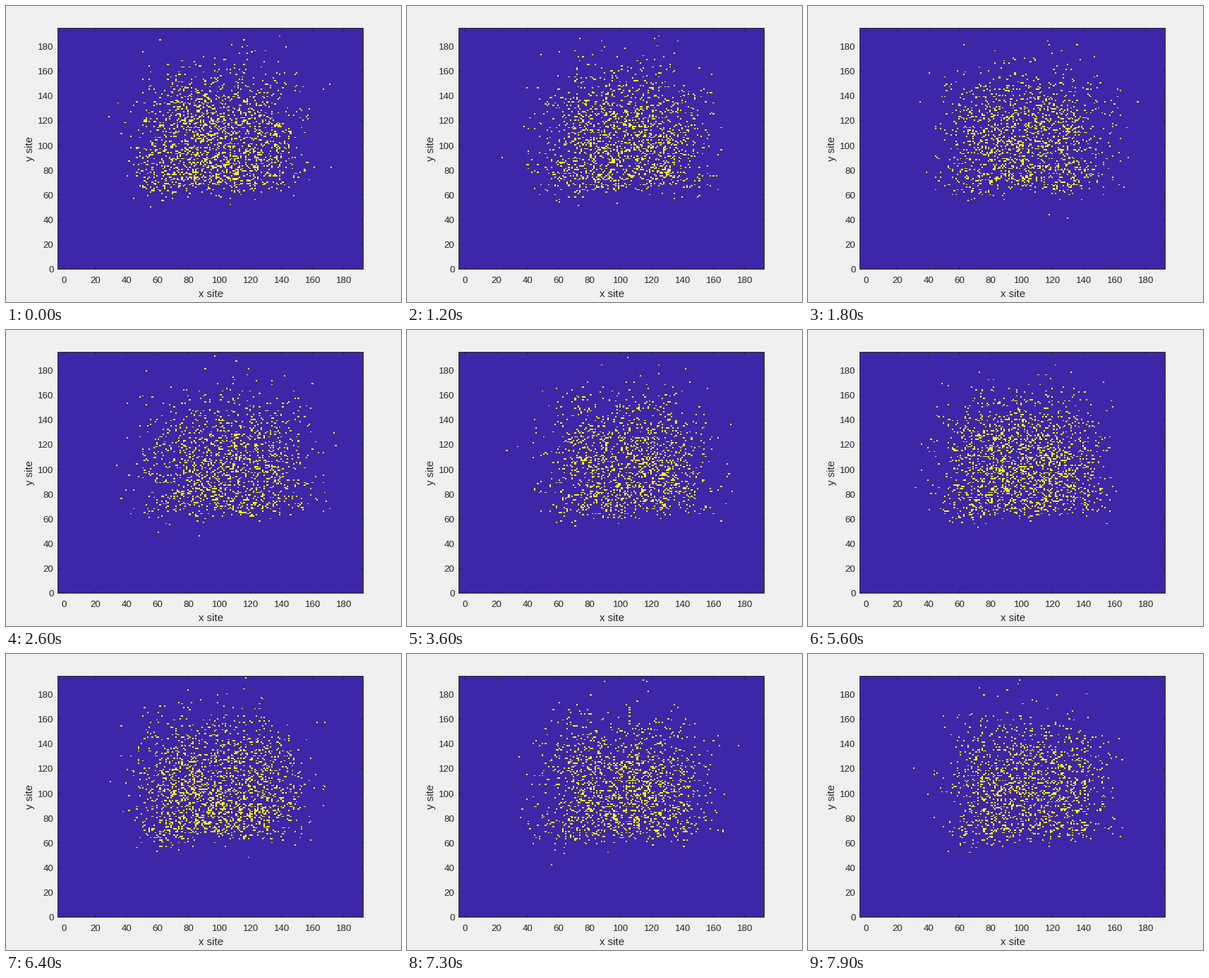
A matplotlib script for the animation above (8 s loop, 560 by 420 pixels).

```python
import numpy as np
import matplotlib.pyplot as plt
from matplotlib.animation import FuncAnimation
from matplotlib.colors import ListedColormap

W, H, DPI = 560, 420, 100
LEFT, TOP, AX_W, AX_H = 73, 31, 433, 342
X_LIM, Y_LIM = (-4.1, 192.5), (0, 194.5)
STEP, LOOP = 100, 8000
INK = "#262626"
PX = 72 / DPI  # points per pixel

plt.rcParams["font.family"] = "Liberation Sans"

# Moments when a new shot appears
SHOTS = [0, *range(1000, 6401, 200), *range(6900, 7901, 200)]

# Slow drift of the cloud: time, centre in x, number of filled sites
KEYS = np.array([
    (0, 99, 1650), (1800, 104, 1400), (2600, 105, 1300), (3600, 106, 1350),
    (4800, 102, 1580), (6400, 100, 1680), (7900, 105, 1320),
])

xs, ys = np.arange(-4, 193), np.arange(0, 195)
X, Y = np.meshgrid(xs, ys)


def density(cx):
    """Flat-topped in x; sharp lower edge and long upper tail in y."""
    across = np.exp(-np.abs((X - cx) / 44) ** 3.5)
    floor = 66 - 7 * np.exp(-((X - 62) / 14) ** 2)
    rise = 1 / (1 + np.exp((floor - Y) / 3))
    tail = np.exp(-(np.maximum(Y - 95, 0) / 52) ** 2.6)
    return across * rise * tail


def shot(k):
    t = SHOTS[k]
    cx, count = (np.interp(t, KEYS[:, 0], KEYS[:, c]) for c in (1, 2))
    p = density(cx).ravel()
    rng = np.random.default_rng(40 + k)
    grid = np.zeros(p.size)
    grid[rng.choice(p.size, int(count), replace=False, p=p / p.sum())] = 1
    return grid.reshape(X.shape)


grids = [shot(k) for k in range(len(SHOTS))]

fig = plt.figure(figsize=(W / DPI, H / DPI), dpi=DPI, facecolor="#f0f0f0")
ax = fig.add_axes([LEFT / W, 1 - (TOP + AX_H) / H, AX_W / W, AX_H / H])
img = ax.imshow(grids[0], cmap=ListedColormap(["#3e26a8", "#f9fb15"]),
                vmin=0, vmax=1, origin="lower", aspect="auto",
                interpolation="nearest", extent=(-4.5, 192.5, -0.5, 194.5))
ticks = range(0, 181, 20)
ax.set(xlim=X_LIM, ylim=Y_LIM, xticks=ticks, yticks=ticks)
ax.tick_params(direction="in", top=True, right=True, length=4 * PX,
               width=PX, color=INK, labelbottom=False, labelleft=False)
for side in ax.spines.values():
    side.set(color=INK, linewidth=PX)


def label(x, y, text, size, ha="center", angle=0):
    fig.text(x / W, 1 - y / H, text, size=size * PX, color=INK, ha=ha,
             va="baseline", rotation=angle, rotation_mode="anchor")


for v in ticks:
    tx = LEFT + (v - X_LIM[0]) / (X_LIM[1] - X_LIM[0]) * AX_W
    ty = TOP + AX_H - v / Y_LIM[1] * AX_H
    label(tx + 0.5, 393, str(v), 13.33)
    label(67.5, ty + 5.5, str(v), 13.33, ha="right")
label(290.5, 413, "x site", 15)
label(38, 202, "y site", 15, angle=90)


def draw(i):
    k = np.searchsorted(SHOTS, i * STEP, side="right") - 1
    img.set_data(grids[k])
    return (img,)


anim = FuncAnimation(fig, draw, frames=LOOP // STEP, interval=STEP,
                     repeat=True, repeat_delay=0, blit=False)
plt.show()
```
